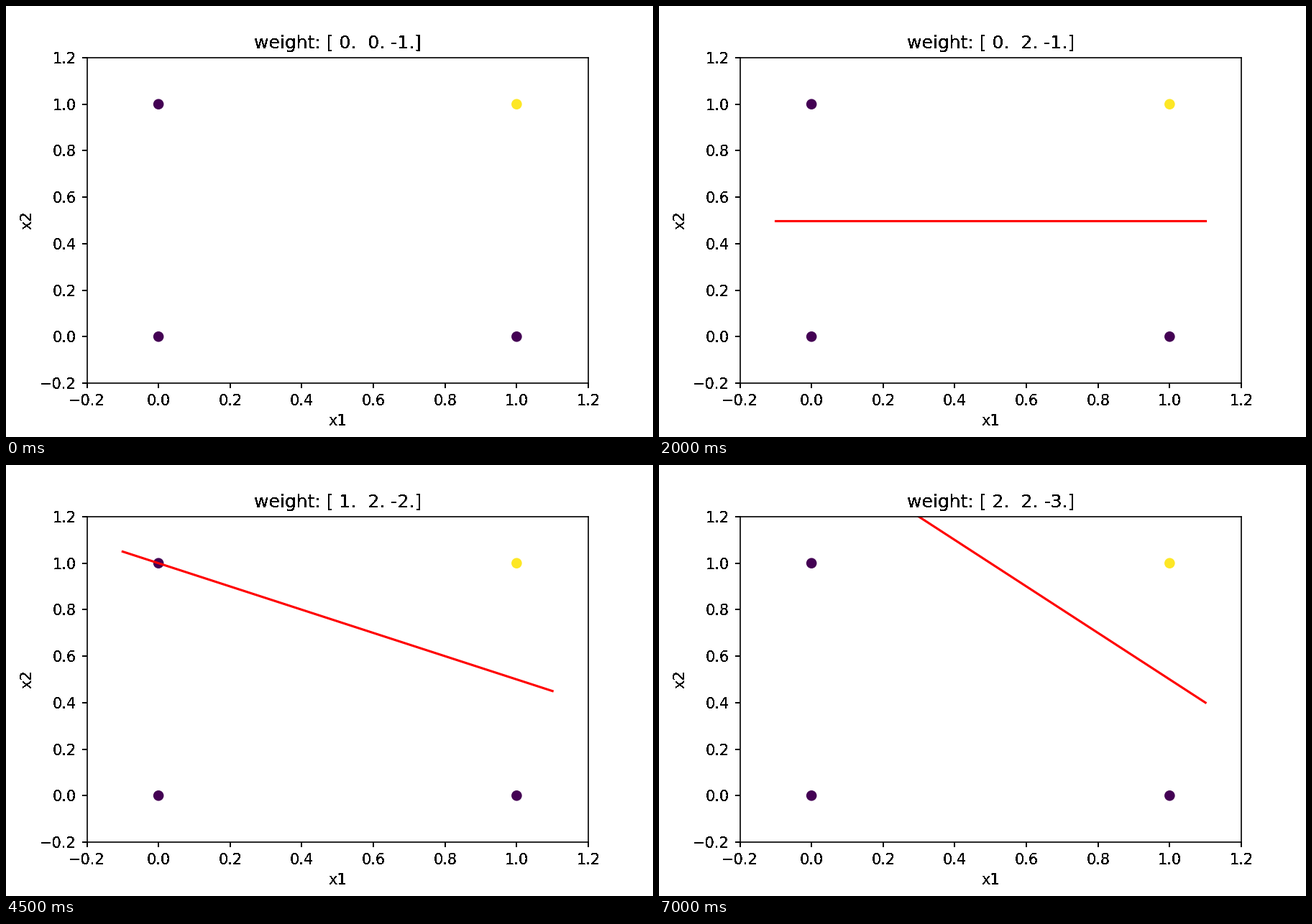
A matplotlib script that plays this animation: 900x600 px, repeating every 8000 ms.

```python
import numpy as np
import matplotlib.pyplot as plt
from matplotlib.animation import FuncAnimation

# Perceptron learning the AND function, one weight update per step.
POINTS = np.array([(0, 0), (0, 1), (1, 0), (1, 1)])
TARGETS = np.array([0, 0, 0, 1])
BOTH, FIRST, SECOND = 3, 2, 1
PICKS = [BOTH, FIRST, BOTH, FIRST, SECOND, BOTH, SECOND, BOTH,
         FIRST, SECOND, BOTH, FIRST, BOTH, SECOND]
STEPS = 16


def train():
    w = np.array([0.0, 0.0, -1.0])
    history = [w]
    for i in PICKS:
        sign = 1 if TARGETS[i] else -1
        w = w + sign * np.append(POINTS[i], 1)
        history.append(w)
    return history


def harden(img, dpi):
    """Give black ink hard, stair-stepped edges."""
    out = img.copy()
    out[..., 3] = img[..., 3] > 0.3
    return out, 0, 0


history = train()
xs = np.array([-0.1, 1.1])

fig, ax = plt.subplots(figsize=(6, 4), dpi=150)
fig.subplots_adjust(left=0.125, right=0.9, bottom=0.125, top=0.88)
ax.scatter(POINTS[:, 0], POINTS[:, 1], c=TARGETS, cmap="viridis")
line, = ax.plot([], [], color="red", lw=1.5)
ax.set(xlim=(-0.2, 1.2), ylim=(-0.2, 1.2), xlabel="x1", ylabel="x2")
title = ax.set_title("")

inked = [title, ax.xaxis.label, ax.yaxis.label]
for axis in (ax.xaxis, ax.yaxis):
    inked += axis.get_ticklabels() + list(axis.get_ticklines())
for artist in inked:
    artist.set_agg_filter(harden)


def draw(step):
    w1, w2, b = w = history[min(step, len(history) - 1)]
    title.set_text(f"weight: {w}")
    if w2:
        line.set_data(xs, -(w1 * xs + b) / w2)
    else:
        line.set_data([], [])
    return line, title


anim = FuncAnimation(fig, draw, frames=STEPS, interval=500,
                     init_func=lambda: draw(0), repeat=True,
                     repeat_delay=0, blit=False)
plt.show()
```
